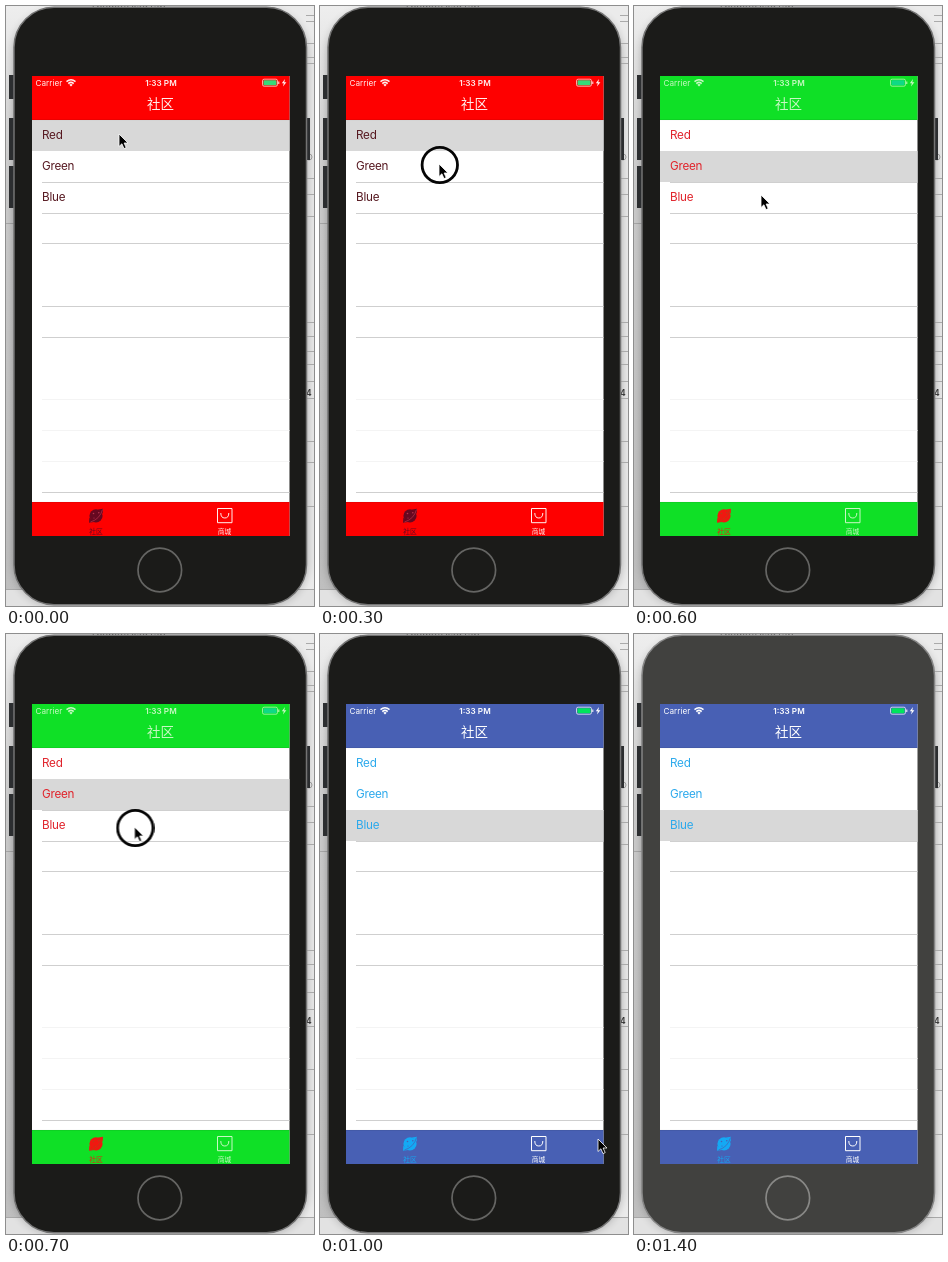
An HTML page that plays this animation: 308 px wide and 600 px high, repeating every 1.5 s.

```html
<!DOCTYPE html>
<html lang="zh-Hans">
<head>
<meta charset="utf-8">
<title>Theme switcher</title>
<style>
html, body { margin: 0; width: 100%; height: 100%; overflow: hidden; background: #e4e4e4; }
svg { display: block; width: 308px; height: 600px; font-family: Inter, "Noto Sans CJK SC", "Noto Sans CJK", sans-serif; }
#stage, #pick, #cursor, #ring, #phone { animation: 1.5s step-end infinite; }
#stage { animation-name: theme; }
#pick { animation-name: pick; }
#cursor { animation-name: move; }
#ring { animation-name: press; }
#phone { animation-name: blur; }

.bar { fill: var(--bar); }
.tint { fill: var(--tint); }
.label { fill: var(--label); font-size: 11.7px; letter-spacing: -.25px; }
.pale { fill: var(--pale); }
.line { fill: none; stroke: var(--pale); }
.status { font-size: 8.2px; }
.cjk { font-family: "Noto Sans CJK SC", "Noto Sans CJK", sans-serif; text-anchor: middle; }
.tab { font-size: 6.8px; font-weight: 500; }

@keyframes theme {
  0%, 100% { --bar: #fe0000; --tint: #670820; --label: #561820; --pale: #fff0ee; --cell: #35d978; --spot: #b8344c; }
  26.66% { --bar: #0fe026; --tint: #f01810; --label: #e0232b; --pale: #c9f8c4; --cell: #10d986; --spot: #b84018; }
  53.33% { --bar: #4860b4; --tint: #14a9f4; --label: #2ba9ec; --pale: #fff; --cell: #00e45c; --spot: #4860b4; }
}
@keyframes pick {
  0%, 100% { transform: translateY(0); }
  26.66% { transform: translateY(31px); }
  53.33% { transform: translateY(62px); }
}
@keyframes move {
  0%, 100% { transform: translate(113px, 128px); }
  6.66% { transform: translate(115px, 138px); }
  13.33% { transform: translate(118px, 153px); }
  19.99% { transform: translate(119px, 158px); }
  26.66% { transform: translate(120px, 160px); }
  33.33% { transform: translate(122px, 171px); }
  39.99% { transform: translate(127px, 189px); }
  46.66% { transform: translate(128.5px, 193px); }
  53.33% { transform: translate(195px, 304px); }
  59.99% { transform: translate(245px, 410px); }
  66.66% { transform: translate(278px, 505px); }
  73.33% { transform: translate(297px, 577px); }
  79.99% { transform: translate(320px, 620px); }
}
@keyframes press {
  0%, 26.66%, 53.33%, 100% { opacity: 0; }
  19.99%, 46.66% { opacity: 1; }
}
@keyframes blur {
  0%, 100% { --body: #1b1b19; --rim: #747474; --home: #656563; }
  93.33% { --body: #41413f; --rim: #858585; --home: #888886; }
}
</style>
</head>
<body>
<svg id="stage" viewBox="0 0 308 600">
  <defs>
    <linearGradient id="side" x2="0" y2="1">
      <stop offset="0" stop-color="#eee"/>
      <stop offset=".3" stop-color="#ccc"/>
      <stop offset="1" stop-color="#bebebe"/>
    </linearGradient>
    <filter id="soft" x="-20%" y="-20%" width="140%" height="140%"><feGaussianBlur stdDeviation="5"/></filter>
  </defs>

  <!-- desktop behind the device -->
  <rect width="308" height="600" fill="#ebebeb"/>
  <rect width="40" height="600" fill="url(#side)"/>
  <path d="M0 217.5H8M0 583.5H308" stroke="#a8a8a8"/>
  <rect y="584" width="308" height="16" fill="#e2e2e2"/>
  <text x="84" y="5" font-size="10" fill="#555">Theme/UserTab</text>
  <rect x="8" y="5" width="293" height="594" rx="42" fill="#000" opacity=".3" filter="url(#soft)"/>
  <path id="panel" stroke="#aaa"/>
  <text x="300" y="390" font-size="8.5" font-weight="600" fill="#333">4</text>
  <circle cx="303" cy="151" r="3" fill="none" stroke="#999"/>

  <!-- device -->
  <g id="phone">
    <path d="M3 69h6v24h-6zM3 112h6v42h-6zM3 160h6v42h-6zM300 112h4v42h-4z" fill="#2c2e30"/>
    <rect x="8" y="1.2" width="292.5" height="597.6" rx="40" style="fill: var(--body); stroke: var(--rim)" stroke-width="1.5"/>
    <circle cx="153.8" cy="564" r="21.8" fill="none" style="stroke: var(--home)" stroke-width="1.7"/>
  </g>

  <!-- screen -->
  <rect x="26" y="70" width="257.5" height="460" fill="#fff"/>
  <g id="rules" fill="none"></g>
  <rect id="pick" x="26" y="114" width="257.5" height="31" fill="#d8d8d8"/>
  <g id="rows" class="label"></g>
  <rect class="bar" x="26" y="70" width="257.5" height="44"/>
  <rect class="bar" x="26" y="496" width="257.5" height="34"/>
  <path d="M26 113.7H283.5M26 496.3H283.5" stroke="#000" stroke-opacity=".15" stroke-width=".6"/>

  <g class="status pale">
    <text x="29.5" y="80">Carrier</text>
    <text x="155" y="80" text-anchor="middle" font-weight="600">1:33 PM</text>
  </g>
  <path class="line" stroke-width="1.5" d="M60.5 75.6Q65 71.8 69.5 75.6M62.3 77.6Q65 75.2 67.7 77.6"/>
  <path class="pale" d="M63.3 78.8Q65 77.4 66.7 78.8L65 80.6z"/>
  <rect class="line" x="256.5" y="73.2" width="15" height="7" rx="1.6" stroke-width=".7"/>
  <rect x="257.5" y="74.2" width="13" height="5" rx=".8" style="fill: var(--cell)"/>
  <path class="pale" d="M272.3 75.5h1v2.4h-1zM279 73l-3.2 4.2h2L277 80.6l3.4-4.4h-2.1z"/>
  <text class="cjk pale" x="154.5" y="103" font-size="13.5" font-weight="500">社区</text>

  <g class="tint">
    <circle cx="90" cy="509.8" r="6.6"/>
    <path d="M92 503.5l5-.8-.3 5zM88 516l-5 .8.3-5z"/>
    <text class="cjk tab" x="90" y="527.6">社区</text>
  </g>
  <path d="M84.5 516Q94 513 96.5 503.5" fill="none" style="stroke: var(--spot)" stroke-width=".7"/>
  <g style="fill: var(--spot)">
    <circle cx="87.5" cy="507.5" r=".8"/><circle cx="92.8" cy="506.8" r=".8"/><circle cx="88" cy="512" r=".6"/>
  </g>
  <path class="line" d="M211.5 502.5h14.5v14.2h-14.5zM214.8 507q0 5 4 5t4-5"/>
  <text class="cjk tab pale" x="218.6" y="527.6">商城</text>

  <!-- pointer -->
  <g id="cursor">
    <circle id="ring" cx=".8" cy="1" r="17.7" fill="none" stroke="#050505" stroke-width="2.8"/>
    <path d="M0 0V12.5L2.9 9.8L5 14.6L7.2 13.6L5.1 9H9z" fill="#000" stroke="#fff" stroke-width=".8"/>
  </g>
</svg>
<script>
const el = id => document.getElementById(id);
const rule = (y, color) => `<path d="M36 ${y + .5}H283.5" stroke="${color}"/>`;

el('rules').innerHTML =
  [176, 207, 237, 300, 331, 486].map(y => rule(y, '#cfcfcf')).join('') +
  [393, 424, 455].map(y => rule(y, '#f4f4f4')).join('');
el('rows').innerHTML = ['Red', 'Green', 'Blue']
  .map((name, i) => `<text x="36" y="${133.3 + 31 * i}">${name}</text>`).join('');
el('panel').setAttribute('d', [9, 15, 37, 51, 57, 172, 188, 210, 316, 330, 345, 358, 375, 392, 435, 456, 500]
  .map(y => `M300 ${y + .5}H308`).join(''));
</script>
</body>
</html>
```
